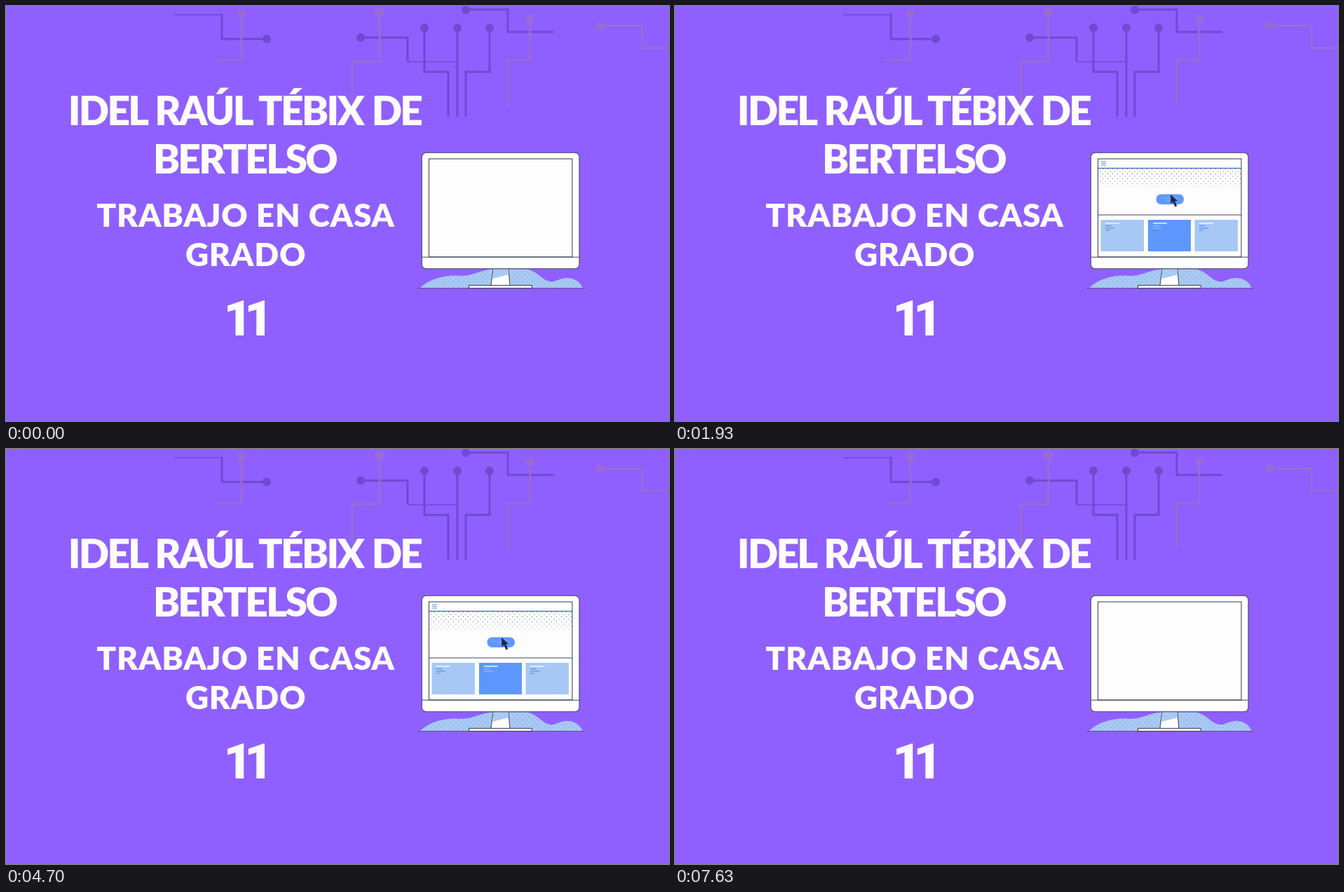
Recreate the animation shown at these times as an HTML page. Size 946 px wide and 592 px high, loop 7660 ms.

```html
<!DOCTYPE html>
<html lang="es">
<head>
<meta charset="utf-8">
<title>Trabajo en casa</title>
<style>
  html, body { margin: 0; width: 100%; height: 100%; overflow: hidden; background: #8f60ff; }
  svg { display: block; width: 100%; height: 100%; }

  text { fill: #fefcff; text-anchor: middle; font-family: Lato, sans-serif; font-weight: 900; }
  .title { font-size: 57px; letter-spacing: -2.7px; word-spacing: 2px; }
  .sub { font-size: 46px; letter-spacing: .7px; }
  .grade { font: 900 71px Roboto, sans-serif; letter-spacing: -11.5px; }

  .wire { fill: none; stroke-width: 3; }
  .dark { stroke: #704ad0; }
  .dark circle { fill: #704ad0; stroke: none; }
  .light { stroke: #9a6bd6; }
  .light circle { fill: #9a6bd6; stroke: none; }

  .ink { stroke: #45485c; stroke-width: 1.1; }

  .slide, .fade, .button, .press, .cursor, .show { animation: 3830ms linear infinite; }
  .slide { animation-name: slide; animation-timing-function: ease; }
  .fade { animation-name: fade; }
  .button { animation-name: button-fade; }
  .press { animation-name: press; }
  .cursor { animation-name: travel; }
  .show { animation-name: show; }

  @keyframes slide {
    0% { transform: translateY(139px); }
    18.3%, 100% { transform: translateY(0); }
  }
  @keyframes fade {
    0%, 67.9% { opacity: 1; }
    78.3%, 100% { opacity: 0; }
  }
  @keyframes button-fade {
    0%, 70.5% { opacity: 1; }
    80.9%, 100% { opacity: 0; }
  }
  @keyframes press {
    0%, 24% { fill: #5f98fb; }
    25.5%, 33% { fill: #3173dc; }
    36%, 100% { fill: #5f98fb; }
  }
  @keyframes travel {
    0% { transform: translate(826px, 304px); }
    3.7% { transform: translate(803px, 315px); }
    10% { transform: translate(760px, 304px); animation-timing-function: ease-out; }
    22%, 100% { transform: translate(707px, 269px); }
  }
  @keyframes show {
    0% { opacity: 0; }
    3.7% { opacity: .4; }
    8%, 65% { opacity: 1; }
    73%, 100% { opacity: 0; }
  }
</style>
</head>
<body>
<svg viewBox="0 0 946 592">
  <defs>
    <pattern id="dots" width="7" height="7" patternUnits="userSpaceOnUse">
      <path d="M1 1h1v1h-1zM4.500 4.500h1v1h-1z" fill="#4a5568"/>
    </pattern>
    <linearGradient id="thin" x2="0" y2="1">
      <stop offset=".4" stop-color="#fff"/>
      <stop offset="1" stop-color="#fff" stop-opacity=".35"/>
    </linearGradient>
    <mask id="dotMask"><rect x="604" y="232" width="204" height="27" fill="url(#thin)"/></mask>
    <clipPath id="screen"><rect x="604" y="218.500" width="203.500" height="139"/></clipPath>
    <path id="hill" d="M591 402C602 391 622 384 642 384.500C666 387 672 377 696 375.500H742C760 377 766 396 782 393C796 386 814 384 823 402Z"/>
    <g id="copy" fill="none" stroke-width="1.300">
      <path d="M614 310h20" stroke="#fff"/>
      <path d="M614 313.700h9M614 317h13M614 320h6" stroke="#5089ec" stroke-width="1"/>
    </g>
  </defs>

  <rect width="946" height="592" fill="#8f60ff"/>

  <g class="wire dark">
    <path d="M308 11V47H372M506 45H573V79M597 31V94H631V158M644 31V158M690 31V94H656V158M656 5H716V37H781"/>
    <path d="M240 12.500H308M573 79.500H644" stroke-width="1.500"/>
    <circle cx="372" cy="47" r="6"/>
    <circle cx="506" cy="45" r="6"/>
    <circle cx="597" cy="31" r="6"/>
    <circle cx="644" cy="31" r="6"/>
    <circle cx="690" cy="31" r="6"/>
    <circle cx="656" cy="5.500" r="6"/>
  </g>
  <g class="wire light">
    <path d="M336 12V77.500H302M533 9V79H494V149M748 18V77.500H716V142M848 28H908V59.500H946"/>
    <circle cx="336" cy="12" r="6.500"/>
    <circle cx="533" cy="9" r="7"/>
    <circle cx="748" cy="18" r="6"/>
    <circle cx="848" cy="28" r="6"/>
  </g>

  <text class="title" x="340.500" y="170">IDEL RAÚL TÉBIX DE</text>
  <text class="title" x="340.500" y="239">BERTELSO</text>
  <text class="sub" x="342" y="315">TRABAJO EN CASA</text>
  <text class="sub" x="342" y="371">GRADO</text>
  <text class="grade" x="340" y="470">11</text>

  <use href="#hill" fill="#a7c9f4"/>
  <use href="#hill" fill="url(#dots)" opacity=".5"/>
  <path class="ink" d="M587 402.800H826" opacity=".7"/>
  <path class="ink" d="M695 375H717L719 398.500H692Z" fill="#fff"/>
  <path d="M695.500 375.500H716.500L717.500 383L694.500 389Z" fill="#a7c9f4"/>
  <rect class="ink" x="660.500" y="398.500" width="90" height="4" fill="#fff"/>
  <rect class="ink" x="593.300" y="209.300" width="224.700" height="165.400" rx="6" fill="#fff"/>
  <rect class="ink" x="603.500" y="218" width="204.500" height="140" fill="#fdfdfe"/>
  <path class="ink" d="M593.300 358.300H818"/>

  <g clip-path="url(#screen)">
    <g class="slide">
      <g class="fade">
        <path d="M608 222H615M608 224.500H615M608 227H615" stroke="#5d94f0" stroke-width="1.200"/>
        <rect x="604" y="232" width="204" height="27" fill="url(#dots)" mask="url(#dotMask)"/>
        <path d="M604 231.500H808" stroke="#4c7fc9" stroke-width="1.500"/>
        <path class="ink" d="M604 298H808"/>
        <rect x="607.500" y="305" width="61.500" height="45" fill="#a7c8f4"/>
        <rect x="675" y="305" width="61" height="45" fill="#5d97fd"/>
        <rect x="741.500" y="305" width="61.500" height="45" fill="#a7c8f4"/>
        <use href="#copy"/>
        <use href="#copy" x="68"/>
        <path d="M682 313.700h9M682 317h13" stroke="#a7c8f4"/>
        <use href="#copy" x="134"/>
      </g>
      <g class="button">
        <rect class="press" x="686.500" y="268.500" width="39.500" height="14.500" rx="7.200"/>
        <path d="M695 274.300H717M700 277.300H712" stroke="#8ab6ff" opacity=".65"/>
      </g>
    </g>
  </g>

  <g class="show">
    <path class="cursor" d="M0 0L.500 13L3.600 10.500L6.500 17.500L9.200 16.300L6.200 9.500L10 9Z" fill="#1f2937"/>
  </g>
</svg>
</body>
</html>
```
